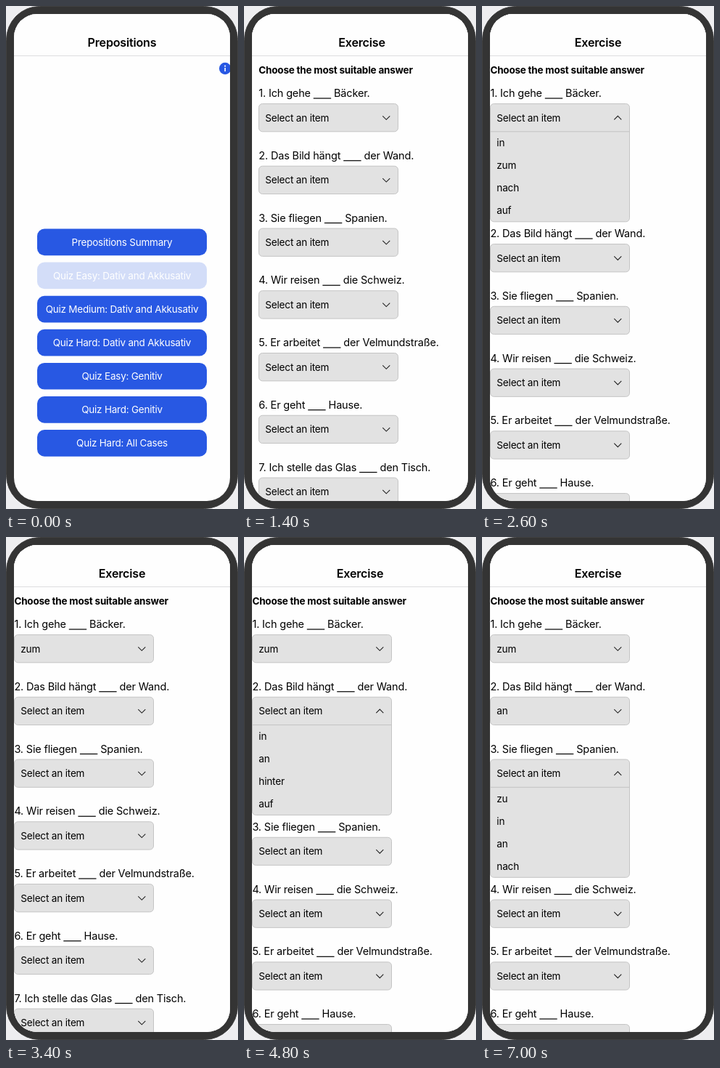
These frames come from a looping animation (320 px wide and 692 px high, 8 s). An HTML page with a canvas:

```html
<!DOCTYPE html>
<html lang="en">
<head>
<meta charset="utf-8">
<title>Prepositions quiz</title>
<style>
html, body { margin: 0; width: 100%; height: 100%; overflow: hidden; background: #eeeef0; }
canvas { display: block; width: 320px; height: 692px; }
</style>
</head>
<body>
<canvas id="stage"></canvas>
<script>
const W = 320, H = 692, LOOP = 8000, STEP = 200;
const BLUE = '#2858e3', GREY = '#e2e2e2', EDGE = '#c4c4c4', INK = '#000';
const SCREEN = { x: 11, y: 11, w: 298, h: 670 };
const HEADER_Y = 68, PAGE_PAD = 10;

const MENU = [
  'Prepositions Summary',
  'Quiz Easy: Dativ and Akkusativ',
  'Quiz Medium: Dativ and Akkusativ',
  'Quiz Hard: Dativ and Akkusativ',
  'Quiz Easy: Genitiv',
  'Quiz Hard: Genitiv',
  'Quiz Hard: All Cases'
];

// The gap to fill in sits between the two halves of each question.
const QUESTIONS = [
  ['1. Ich gehe ', ' Bäcker.'],
  ['2. Das Bild hängt ', ' der Wand.'],
  ['3. Sie fliegen ', ' Spanien.'],
  ['4. Wir reisen ', ' die Schweiz.'],
  ['5. Er arbeitet ', ' der Velmundstraße.'],
  ['6. Er geht ', ' Hause.'],
  ['7. Ich stelle das Glas ', ' den Tisch.']
];

// Each select: when pressed, opened and answered.
const SELECTS = [
  { press: 2200, open: 2400, close: 3400, items: ['in', 'zum', 'nach', 'auf'], answer: 'zum' },
  { press: 4400, open: 4600, close: 5800, items: ['in', 'an', 'hinter', 'auf'], answer: 'an' },
  { press: 6600, open: 6800, close: LOOP, items: ['zu', 'in', 'an', 'nach'], answer: '', lateFade: 0.7 }
];

const STYLES = {
  title: { font: '600 16.1px Inter, "Open Sans", sans-serif', track: '-0.2px' },
  bold: { font: '700 13.5px Inter, "Open Sans", sans-serif', track: '-0.22px' },
  body: { font: '400 14.5px Inter, "Open Sans", sans-serif', track: '-0.17px' },
  button: { font: '400 13.5px Inter, "Open Sans", sans-serif', track: '-0.23px' },
  item: { font: '400 13.6px Inter, "Open Sans", sans-serif', track: '-0.2px' }
};

const canvas = document.getElementById('stage');
const ctx = canvas.getContext('2d');
const dpr = window.devicePixelRatio || 1;
canvas.width = Math.round(W * dpr);
canvas.height = Math.round(H * dpr);

// Draws text and returns its advance width.
function text(str, x, y, style, color = INK, align = 'left') {
  ctx.font = STYLES[style].font;
  ctx.letterSpacing = STYLES[style].track;
  ctx.fillStyle = color;
  ctx.textAlign = align;
  ctx.fillText(str, x, y);
  return ctx.measureText(str).width;
}

function roundRect(x, y, w, h, r, fill, stroke) {
  ctx.beginPath();
  ctx.roundRect(x, y, w, h, r);
  if (fill) { ctx.fillStyle = fill; ctx.fill(); }
  if (stroke) { ctx.strokeStyle = stroke; ctx.lineWidth = 1; ctx.stroke(); }
}

function withAlpha(alpha, draw) {
  ctx.save();
  ctx.globalAlpha *= alpha;
  draw();
  ctx.restore();
}

function infoIcon(x, y) {
  ctx.fillStyle = BLUE;
  ctx.beginPath();
  ctx.arc(x, y, 8.2, 0, Math.PI * 2);
  ctx.fill();
  ctx.fillStyle = '#fff';
  ctx.beginPath();
  ctx.arc(x, y - 3.3, 1.1, 0, Math.PI * 2);
  ctx.fill();
  ctx.fillRect(x - 0.8, y - 1, 1.6, 5);
}

function drawMenu(t) {
  infoIcon(302.2, 86);
  MENU.forEach((label, i) => {
    const y = 306.5 + i * 46.1;
    const pressed = i === 1 && t < 200;
    roundRect(43, y, 234, 36.7, 10, pressed ? '#d3ddf8' : BLUE);
    text(label, 160, y + 23.1, 'button', '#fff', 'center');
  });
}

function chevron(x, y, up) {
  const d = up ? -2.5 : 2.5;
  ctx.beginPath();
  ctx.moveTo(x - 5, y - d);
  ctx.lineTo(x, y + d);
  ctx.lineTo(x + 5, y - d);
  ctx.strokeStyle = '#222';
  ctx.lineWidth = 1.1;
  ctx.stroke();
}

function drawSelect(y, label, open, items, alpha) {
  const x = 11.5, w = 192, h = 38.3;
  if (open) {
    roundRect(x, y, w, 162.3, 5, GREY, EDGE);
    ctx.fillStyle = EDGE;
    ctx.fillRect(x, y + h - 0.5, w, 1);
    items.forEach((item, i) => text(item, 20.3, y + 58.6 + i * 31, 'item'));
  }
  withAlpha(alpha, () => {
    if (!open) roundRect(x, y, w, h, 5, GREY, EDGE);
    text(label, 20.3, y + 24, 'item');
    chevron(187.3, y + 19.3, open);
  });
}

function selectAlpha(s, t) {
  if (t >= s.press && t < s.open) return 0.2;
  if (s.lateFade && t >= s.open && t < s.open + STEP) return s.lateFade;
  return 1;
}

function drawExercise(t) {
  text('Choose the most suitable answer', 11.4, 93, 'bold');
  let y = 134.5;
  QUESTIONS.forEach(([before, after], i) => {
    const s = SELECTS[i];
    const open = !!s && t >= s.open && t < s.close;
    const label = s && t >= s.close ? s.answer : 'Select an item';
    const base = y - 9.4;
    const gap = 11.4 + text(before, 11.4, base, 'body');
    ctx.fillRect(gap, base + 1.3, 24.4, 1.2);
    text(after, gap + 24.4, base, 'body');
    drawSelect(y, label, open, s && s.items, s ? selectAlpha(s, t) : 1);
    y += 85.75 + (open ? 107.3 : 0);
  });
}

// Share of the page push still to go: a critically damped spring.
function pushLeft(t) {
  const k = Math.max(0, t - 1043) * 0.015;
  return t >= 1600 ? 0 : (1 + k) * Math.exp(-k);
}

function drawHeader(left) {
  ctx.fillStyle = '#fefefe';
  ctx.fillRect(SCREEN.x, SCREEN.y, SCREEN.w, HEADER_Y - SCREEN.y);
  ctx.fillStyle = '#dedee0';
  ctx.fillRect(SCREEN.x, HEADER_Y, SCREEN.w, 1);
  const done = 1 - left;
  withAlpha(left * left, () => text('Prepositions', 160 - done * 50, 55.6, 'title', INK, 'center'));
  withAlpha(1 - left * left, () => text('Exercise', 160 + left * 83, 55.6, 'title', INK, 'center'));
}

function drawPages(t, left) {
  const { x, y, w, h } = SCREEN;
  if (left > 0) {
    ctx.save();
    ctx.translate(-0.3 * w * (1 - left), 0);
    drawMenu(t);
    ctx.restore();
  }
  if (left < 1) {
    ctx.save();
    ctx.translate(left * w, 0);
    ctx.fillStyle = '#fefefe';
    ctx.fillRect(x - PAGE_PAD, y, w + PAGE_PAD, h);
    drawExercise(t);
    ctx.restore();
  }
}

function draw(t) {
  const { x, y, w, h } = SCREEN;
  const left = pushLeft(t);
  ctx.setTransform(dpr, 0, 0, dpr, 0, 0);
  ctx.fillStyle = '#eeeef0';
  ctx.fillRect(0, 0, W, H);
  roundRect(0.5, 0.5, W - 1, H - 1, 46, '#343434', '#404040');
  ctx.save();
  roundRect(x, y, w, h, 32, '#fefefe');
  ctx.clip();
  drawPages(t, left);
  drawHeader(left);
  ctx.restore();
}

let start = null;
function tick(now) {
  if (start === null) start = now;
  const t = (now - start) % LOOP;
  draw(Math.floor(t / STEP) * STEP);
  requestAnimationFrame(tick);
}
draw(0);
requestAnimationFrame(tick);
</script>
</body>
</html>
```
